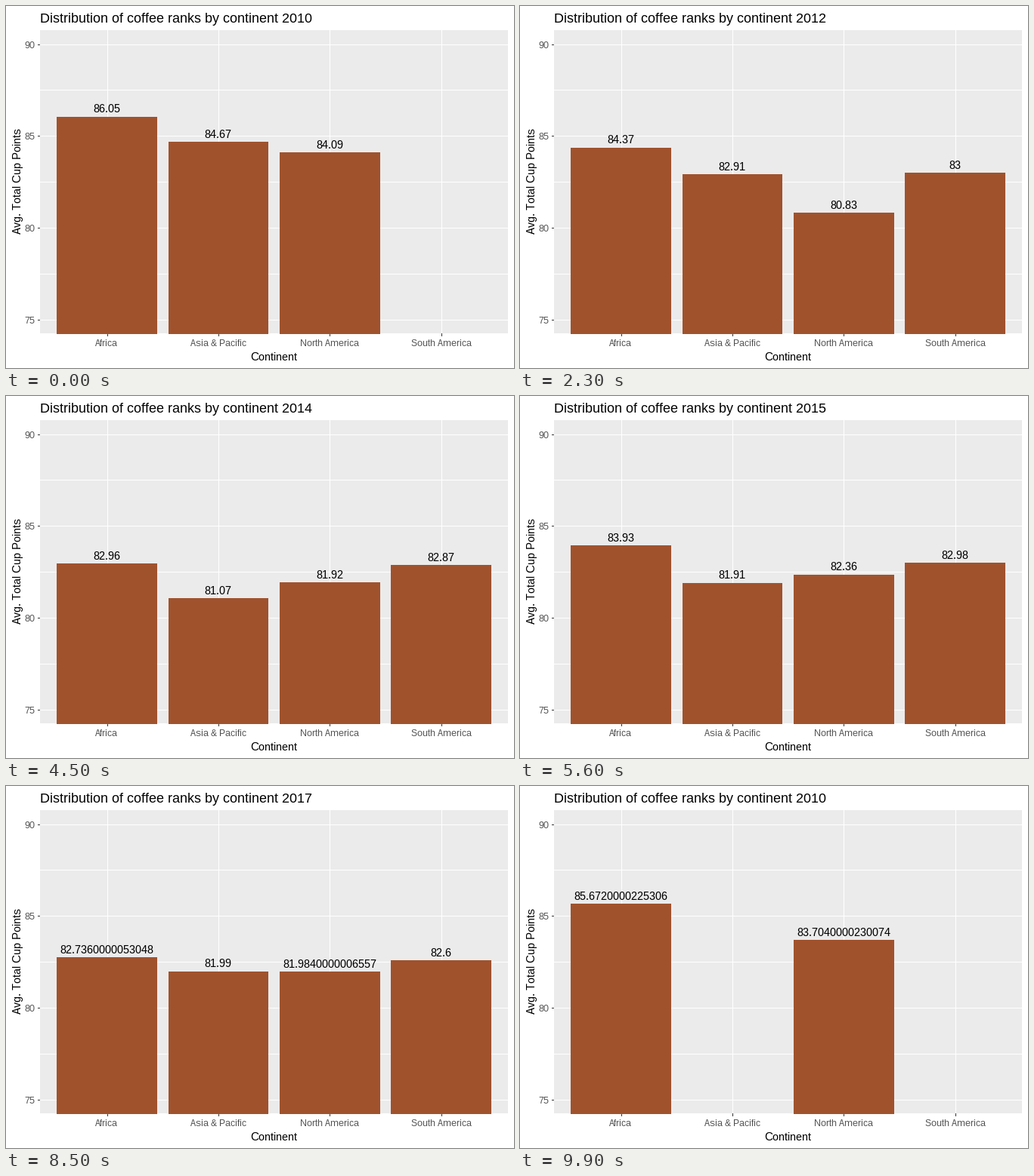
Write a matplotlib script that moves like this. It is 672 px wide and 480 px high and loops after 10000 ms.

```python
import numpy as np
import matplotlib.pyplot as plt
from matplotlib.animation import FuncAnimation
from matplotlib.patches import Rectangle

plt.rcParams.update({
    "font.family": "Liberation Sans",
    "text.hinting": "native",
    "text.hinting_factor": 1,
    "text.kerning_factor": 6,
})

W, H, DPI = 672, 480, 96
LEFT, RIGHT, TOP, BOTTOM = 45, 664, 32, 434
STEP, UNIT, Y80 = 147.4, 24.36, 294.55   # px per category, px per point, y of 80
BAR, INK, TICK = "#A0522D", "#4D4D4D", "#333333"
FIRST_YEAR, YEARS, FRAMES = 2010, 9, 100

# yearly averages; None where a continent has no entry
SCORES = {
    "Africa": (86.05, 85.01, 84.37, 82.03, 82.96, 83.93, 83.07, 82.38, 84.16),
    "Asia & Pacific": (84.67, 83.62, 82.91, 79.85, 81.07, 81.91, 83.61, 81.99, None),
    "North America": (84.09, 82.31, 80.83, 81.48, 81.92, 82.36, 82.75, 81.94, 82.16),
    "South America": (None, 82.65, 83, 83.07, 82.87, 82.98, 82.6, 82.6, None),
}


def ypos(v):
    return Y80 - (v - 80) * UNIT


def xpos(i):
    return 45.6 + (i + 0.6) * STEP


fig = plt.figure(figsize=(W / DPI, H / DPI), dpi=DPI, facecolor="white")
ax = fig.add_axes([0, 0, 1, 1])
ax.set_xlim(0, W)
ax.set_ylim(H, 0)
ax.axis("off")


def box(x0, y0, x1, y1, color, z=1):
    r = Rectangle((x0, y0), x1 - x0, y1 - y0, facecolor=color,
                  linewidth=0, antialiased=False, zorder=z)
    return ax.add_patch(r)


def text(x, y, s, px, color="black", ha="center", **kw):
    return ax.text(x, y, s, fontsize=px * 72 / DPI, color=color, ha=ha,
                   va="baseline", zorder=5, **kw)


box(LEFT, TOP, RIGHT, BOTTOM, "#EBEBEB")
for v in np.arange(75, 91, 2.5):
    y = int(ypos(v) + 0.1)
    box(LEFT, y, RIGHT, y + 1, "white", 2)
    if v % 5 == 0:
        box(LEFT - 3, y, LEFT, y + 1, TICK)
        text(38, y + 5, f"{v:g}", 12, INK, ha="right")

bars, labels = [], []
for i, name in enumerate(SCORES):
    x = xpos(i)
    box(int(x), TOP, int(x) + 1, BOTTOM, "white", 2)
    box(int(x), BOTTOM, int(x) + 1, BOTTOM + 4, TICK)
    text(x - 0.7, 451, name, 12, INK)
    bars.append(box(int(x - 0.45 * STEP), TOP, int(x + 0.45 * STEP), BOTTOM + 1, BAR, 3))
    labels.append(text(x - 0.7, TOP, "", 15))

text(354.4, 470, "Continent", 15)
text(20, 232.5, "Avg. Total Cup Points", 15, rotation=90, rotation_mode="anchor")
title = text(LEFT, 22, "", 18, ha="left")


def phase(frame):
    """Index of the year on show and progress 0..1 towards the next."""
    for s in range(YEARS):
        steps = 6 if s < 2 else 5
        k = frame - (5 + 11 * s + min(s, 2))
        if k < steps:
            return s, max(k, 0) / steps
    return 0, 0.0


def blend(a, b, t):
    # bars without a partner appear or vanish only when the move is over
    if a is None or b is None or t == 0:
        return a
    return a + (b - a) * float(np.float32(t))


def draw(frame):
    s, t = phase(frame)
    nxt = (s + 1) % YEARS
    year = FIRST_YEAR + (nxt if t >= 0.5 else s)
    title.set_text(f"Distribution of coffee ranks by continent {year}")
    for bar, label, scores in zip(bars, labels, SCORES.values()):
        v = blend(scores[s], scores[nxt], t)
        bar.set_visible(v is not None)
        label.set_visible(v is not None)
        if v is None:
            continue
        y = ypos(v)
        bar.set_y(int(y))
        bar.set_height(BOTTOM + 1 - int(y))
        label.set_y(int(y - 5.2))
        label.set_text(f"{v:.15g}")
    return [title, *bars, *labels]


anim = FuncAnimation(fig, draw, frames=FRAMES, interval=100, repeat=True,
                     repeat_delay=0, blit=False)
plt.show()
```
